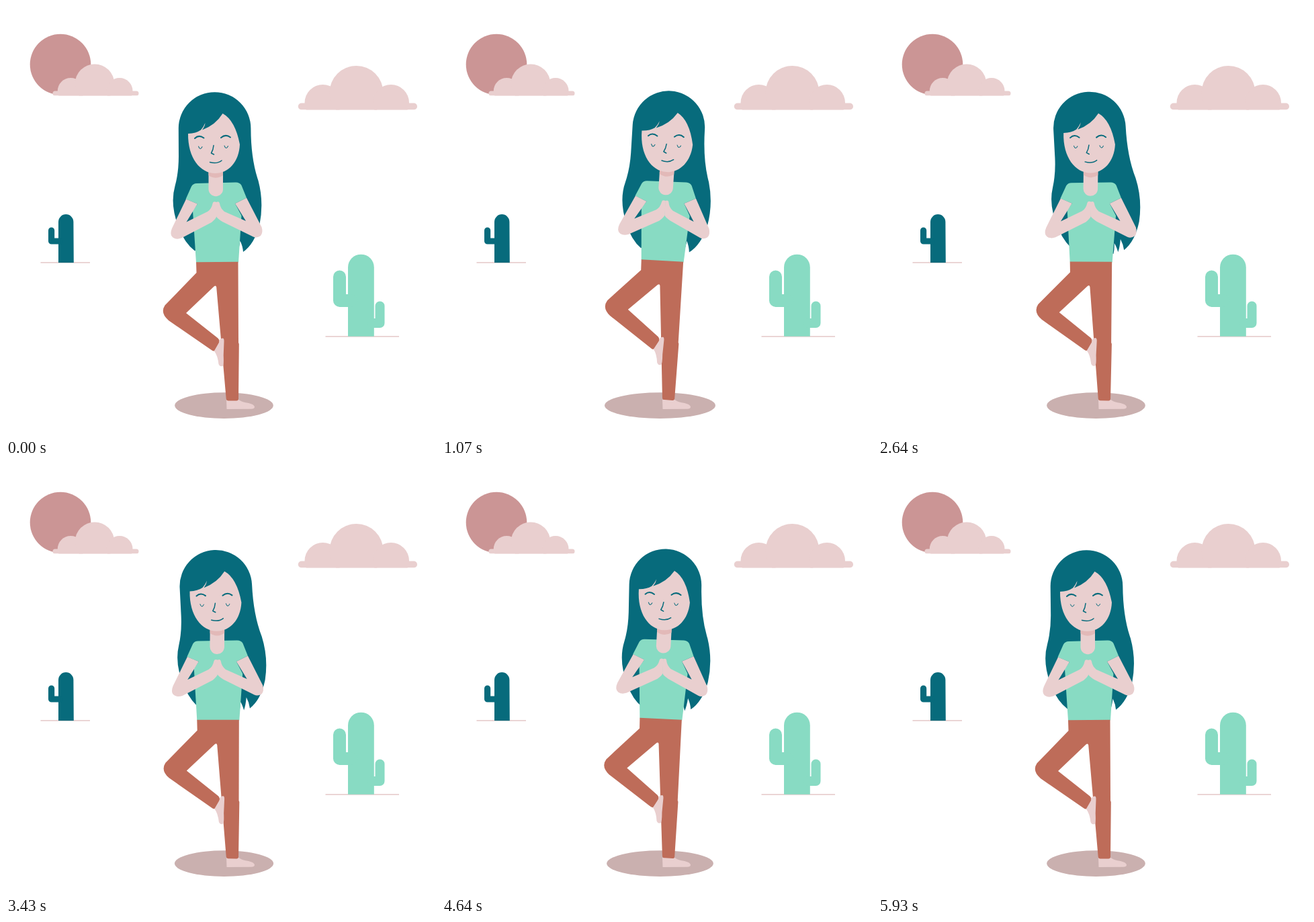
Write an HTML page that moves like this. It is 640 by 640 pixels and loops after 6000 ms.

```html
<!DOCTYPE html>
<html lang="en">
<head>
<meta charset="utf-8">
<title>Tree pose</title>
<style>
  html, body { margin: 0; width: 100%; height: 100%; overflow: hidden; background: #fff; }
  #stage { display: block; width: 100vw; height: 100vh; }
  .teal { fill: #076b7c; }
  .mint { fill: #88dbc3; }
  .skin { fill: #e9cfcf; }
  .rust { fill: #be6c59; }
  .line { fill: none; stroke: #076b7c; stroke-linecap: round; stroke-linejoin: round; }
  .arm { fill: none; stroke-linecap: round; stroke-linejoin: round; }
  .ground { stroke: #e8cfcf; stroke-width: 1.7; }
</style>
</head>
<body>
<svg id="stage" viewBox="0 0 640 640">
  <circle cx="81" cy="87" r="45.3" fill="#cb9595"/>

  <!-- clouds, cut flat at the bottom edge of each nested viewport -->
  <svg class="skin" width="640" height="133.5">
    <circle cx="96.3" cy="126.5" r="19.5"/>
    <circle cx="132" cy="115.8" r="29.3"/>
    <circle cx="169" cy="126.5" r="19.5"/>
    <rect x="69.5" y="126.5" width="128" height="7" rx="3.5"/>
  </svg>
  <svg class="skin" width="640" height="154.5">
    <circle cx="471.5" cy="144" r="27"/>
    <circle cx="521.5" cy="129" r="40"/>
    <circle cx="573" cy="144" r="27"/>
    <rect x="434.8" y="144.5" width="177.2" height="10" rx="5"/>
  </svg>

  <path class="ground" d="M51.5 381.8H125"/>
  <path class="teal" d="M78 382V321.3A11.2 11.2 0 0 1 100.4 321.3L100.8 382Z"/>
  <path class="arm" stroke="#076b7c" stroke-width="9.2" d="M67.6 334V350H80"/>

  <path class="ground" d="M475.5 491.8H585"/>
  <path class="mint" d="M509 491.7V389A19.4 19.4 0 0 1 547.8 389V491.7Z"/>
  <path class="arm" stroke="#88dbc3" stroke-width="19" d="M496.5 403V438.4H514"/>
  <path class="arm" stroke="#88dbc3" stroke-width="14" d="M556.5 446.5V472H545"/>

  <ellipse id="shadow" cx="324.5" cy="594.6" rx="73.3" ry="19.3" fill="#cab0af"/>
  <path class="skin" d="M328 586L345.5 585.5Q352 590 361 591Q370 593 370 597Q369.5 600 364 599.7L328.5 600Z"/>

  <g id="body">
    <path id="hair" class="teal" d="M256.8 182A53.8 53.8 0 0 1 364.4 182Q364.5 228 375.5 260Q384 292 377.5 325Q370 354 353 366Q352.5 358 348.5 349.5Q347 361 344 368.5Q342 360 339 355Q339 364 337 371L300 350L281 364.5Q266 353 257.5 331Q243.5 296 251.5 268Q257 248 257 224Z"/>
    <path class="mint" d="M284 264L342 262.5Q348 262.5 350.5 267L358 285.5L341 294L350.5 312L346 381.5L283 382L278 305L285 294.5L267.5 287.5L276 268.5Q278.5 264 284 264Z"/>
    <path class="skin" d="M301.5 235H323V272.5A10.75 10.75 0 0 1 301.5 272.5Z"/>
    <path fill="#e2b9b8" d="M301.5 244H323V252Q312 259.5 301.5 252Z"/>
    <path class="skin" d="M271 190Q283 189.5 290 184.5Q294 180 296.5 174Q296 179 292 184.5Q312 177 322.5 160Q341 170 348 206C347 232 331 249 311.5 249C289 249 270.5 226 271 190Z"/>

    <g class="line">
      <path stroke-width="2" d="M281 197Q287 191 294.5 196.5M320 196Q327 190 334 195.5"/>
      <path stroke-width="1" d="M286.5 209Q289 215.5 292 209.5M325 208Q327.5 214.5 330.5 208.5"/>
      <path stroke-width="1.5" d="M309 207.5Q308.5 214 305.5 219L309.5 221"/>
      <path stroke-width="1.5" d="M303.5 232.5Q314 235.5 321 230"/>
    </g>

    <path class="skin" d="M268 287.5L247 331Q243 341 249 345Q254 348 261 345.5L306 322Q313 316 313.3 313V292Q308 290 307.5 294Q306 302 300 306L268.5 321.5L285 294.5Z"/>
    <path class="skin" d="M358 285.5L380.5 329Q383 337 379 342Q373.5 346 368 343.5L322 321Q314 316 313 313V292Q317.5 290 318 294Q319 301 325 306L357 320L341 294Z"/>

    <path class="rust" d="M283 381.3L345.5 380.7L346 501L346.8 503L346 584.5Q346 587.5 343 587.5H331Q328 587.5 327.7 584.5L313.2 418.5Q312.5 415 309.5 417.5L268 457L315.5 494.5Q319 498 316.5 502.5L311 512.5Q309.5 514.5 306.5 512.5L242 468Q229 457 236.5 445.5L283.5 397Z"/>
    <path class="skin" d="M309.8 513.5L317 501Q317.5 494 323 494.5Q324.8 495 324.5 500L323.7 520Q324.5 535 322.5 535.8Q318.5 537.5 316.5 533Q315 520 309.8 513.5Z"/>
  </g>
</svg>
<script>
const LOOP = 6000;
const LEAN = 3.8;              // degrees at full sway
const LIFT = 1;                // pixels at full sway
const ANKLE = "337 588", CROWN = "310 198";

const linear = u => u;
const slowStart = u => u ** 1.6;
const sine = u => (1 - Math.cos(Math.PI * u)) / 2;

// Rises from start to peak, then falls back to zero at end
function pulse(t, start, peak, end, rise, fall) {
  if (t <= start || t >= end) return 0;
  return t < peak ? rise((t - start) / (peak - start)) : 1 - fall((t - peak) / (end - peak));
}

// Each loop holds two leans, the second one slower and smaller
const sway = t => pulse(t, 0, 1120, 3010, sine, linear) + 0.96 * pulse(t, 3010, 4800, 5930, slowStart, sine);
const spread = t => pulse(t, 0, 1120, 2500, sine, linear) + 0.78 * pulse(t, 3220, 4800, 5860, slowStart, sine);
// The hair trails behind and is still settling when the loop restarts
const swing = t => 3.6 * pulse(t, 900, 2800, 6300, sine, linear);

const [body, hair, shadow] = ["body", "hair", "shadow"].map(id => document.getElementById(id));

function draw() {
  const t = performance.now() % LOOP;
  const s = sway(t);
  body.setAttribute("transform", `translate(0 ${-LIFT * s}) rotate(${LEAN * s} ${ANKLE})`);
  hair.setAttribute("transform", `rotate(${-swing(t)} ${CROWN})`);
  shadow.setAttribute("rx", 73.3 + 9.2 * spread(t));
  requestAnimationFrame(draw);
}
draw();
</script>
</body>
</html>
```
